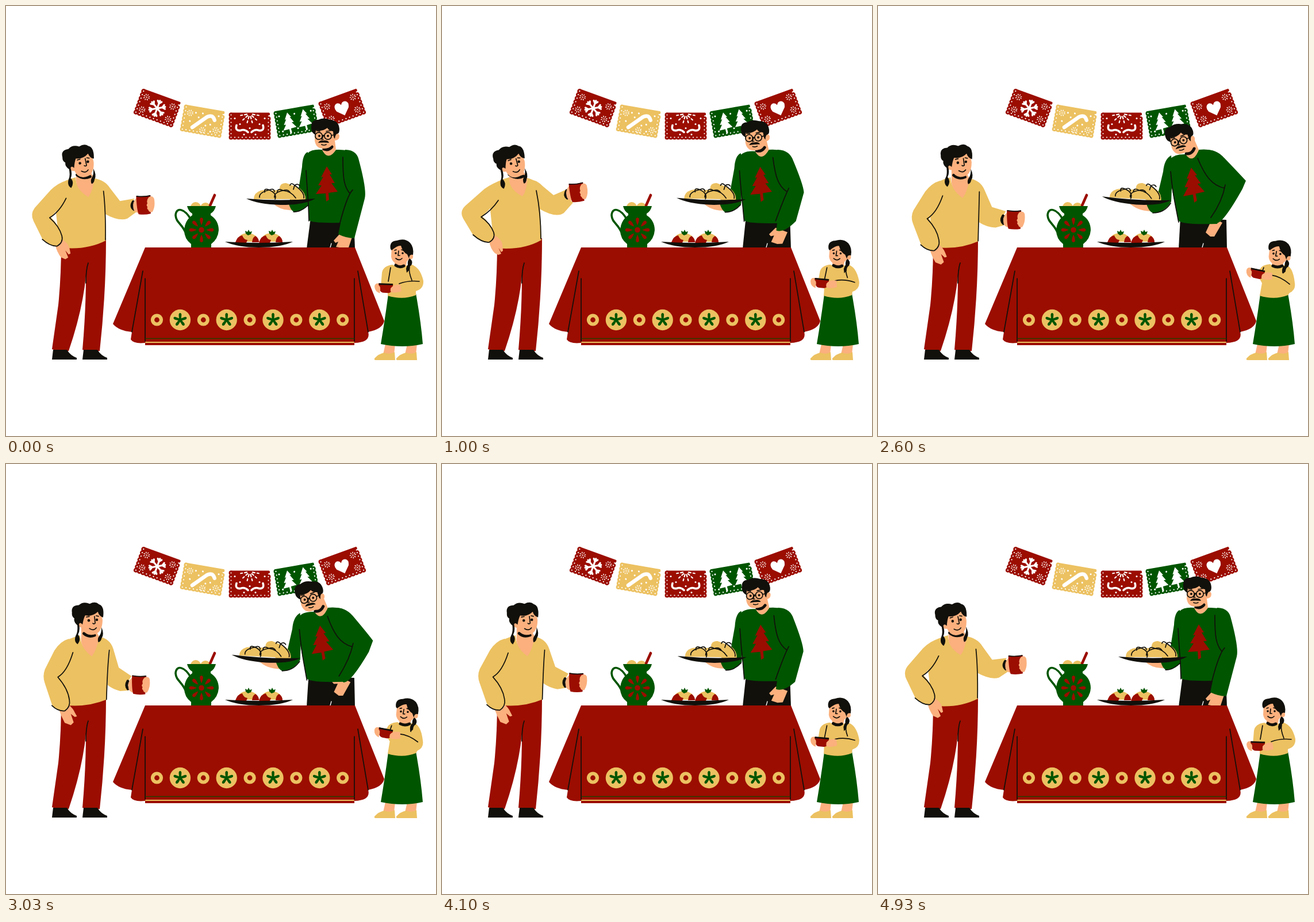
Animation of 748x748 px, one loop 5010 ms. Source, as an HTML page:

```html
<!DOCTYPE html>
<html lang="en">
<head>
<meta charset="utf-8">
<title>Holiday table</title>
<style>
html, body { margin: 0; height: 100%; overflow: hidden; background: #fff }
svg { display: block; width: 100vw; height: 100vh; stroke-linecap: round; stroke-linejoin: round }
.r { fill: #9b0d00 } .g { fill: #005500 } .y { fill: #ecc161 } .s { fill: #fbb07d } .k { fill: #11100b } .w { fill: #fff }
.l { fill: none; stroke: #11100b; stroke-width: 1.7 }
.b { fill: none; stroke: #11100b; stroke-width: 5 }
.cut { fill: none; stroke: #fff }
</style>
</head>
<body>
<svg viewBox="0 0 748 748">
<defs>
  <path id="tree" d="M0-31L9-17 5-17 14-2 8-2 19 13 3 15 4 27-1 30-2 16-19 17-9 2-15 2-6-13-10-12Z"/>
  <g id="burst" class="cut"><circle r="4.2" stroke-width="3" stroke-dasharray="1.2 2.1" stroke-linecap="butt"/><circle r=".6"/></g>
  <g id="shoe"><path class="k" d="M82 598H106Q112 608 123 612V615H80Z"/></g>
  <g id="foot"><path class="s" d="M660 588H677L675 606H656Z"/><path class="y" d="M641 613Q648 605 658 603Q668 607 676 602L677 616H643Q640 616 641 613Z"/></g>
  <g id="sope">
    <path class="y" d="M-18 6Q-16-8 0-9Q17-8 20 6Z"/>
    <path class="r" d="M-21 7Q-17-4-9-5Q-7 2 0 3L-2 8H-20ZM8 7Q9-2 14-4Q20 0 20 7Z"/>
    <path class="g" d="M-3-8L-4-13 0-11 2-15 4-11 8-12 6-7 1-5Z"/>
  </g>
</defs>

<g id="flags"></g>

<g data-phase="0">
  <path class="k" d="M530 368L523 422H607L605 372Z" data-to="M526 368L523 422H607L606 372Z"/>
  <path class="cut" stroke-width="1.3" d="M564 420L566 413"/>
  <path class="s" d="M581 396L570 408 573 412 578 410 574 419 586 421 596 420 602 402Z" data-to="M579 366L567 376 570 379 577 379 570 394 578 401 585 401 599 377Z"/>
  <path class="s" d="M464 343Q475 339 493 340L500 355Q478 357 464 343Z" data-to="M436 342Q447 339 468 340L474 357Q450 356 436 342Z"/>
  <path class="g" d="M550 250Q526 248 521 262L527 372Q528 378 583 377L600 320 604 256Q595 249 574 250Q560 270 550 250Z" data-to="M535 258Q508 257 503 276L522 372Q524 381 590 379L606 330 600 262Q585 247 558 250Q548 274 535 258Z"/>
  <path class="g" d="M525 254Q516 257 515 280L509 318 491 341Q495 356 501 358Q512 359 526 346L527 280Z" data-to="M510 260Q498 266 496 288L488 322 466 341Q470 357 478 360Q498 360 510 340L512 290Z"/>
  <path class="s" d="M550 250Q560 271 574 250L572 234 552 238Z" data-to="M535 258Q548 276 558 250L550 232 532 240Z"/>
  <path class="g" d="M590 250Q608 250 613 265Q628 320 624 335L606 404Q592 404 578 397L592 330 580 265Z" data-to="M570 250Q588 249 602 264L630 293Q640 304 634 318L600 379Q588 378 578 369L604 316 556 268Z"/>
  <path class="l" d="M586 263C586 300 588 314 598 326M603 320Q594 328 581 377" data-to="M556 265C568 294 580 312 603 317M604 311Q599 340 579 368"/>
  <path class="l" d="M522 286Q524 320 526 345L527 374M500 358Q512 359 525 347" data-to="M509 288Q512 320 517 345L523 376M478 360Q498 360 509 343"/>
  <use href="#tree" class="r" transform="translate(558 310) rotate(0)" data-to="translate(548 312) rotate(-6)"/>
  <g transform="translate(478 336) rotate(0)" data-to="translate(449.5 335.5) rotate(3)">
    <path class="y" d="M-2-16Q-3-28 9-28Q24-23 34-18Q44-10 43 2H18Z"/>
    <path class="y" d="M-47 0Q-47-11-35-15Q-26-17-16-15Q-4-17 8-15Q28-15 27 0Z"/>
    <path class="l" d="M-10 0Q-6-10-20-16Q-38-12-37-3M-20-16Q-30-20-28-12M-20-16Q-12-20-11-13M26-2Q18-14 4-15Q-12-12-11-3M4-15Q-6-20-6-12M4-15Q12-18 16-12M40-2Q42-12 24-24M24-24Q18-30 16-24M24-24Q30-28 33-23M24-24L22-17"/>
    <path class="k" d="M-60-1Q0 4 60-1Q42 10 0 10Q-40 9-60-1Z"/>
  </g>
  <path class="b" d="M553 249Q561 252 567 245" data-to="M536 257Q546 258 550 248"/>
  <g transform="translate(552 226) rotate(0)" data-to="translate(523.5 235.5) rotate(-14)">
    <path class="s" d="M-14-14L-15 8Q-13 23 2 22Q16 21 19 8Q28 8 28 0Q27-6 20-3L18-16Z"/>
    <path class="k" d="M-21-13Q-22-29-9-28Q0-33 12-28Q27-27 28-12Q28-5 25-4Q21-4 20 5L18 2 17-8Q9-9 7-14Q-2-7-13-10L-14-2Q-21-6-21-13Z"/>
    <g class="l"><circle cx="-8" r="6.2"/><circle cx="8" r="6.2"/><path d="M-2 0Q0-2 2 0M14-1L20-2M-12-9L-6-8M5-8L12-9M0 0L-3 6H0"/></g>
    <circle class="k" cx="-7" r="2"/><circle class="k" cx="8" r="2"/>
    <path class="k" d="M-9 12Q-6 7 0 8Q8 7 10 12Q0 11-9 12Z"/>
    <path class="l" d="M-3 15Q1 17 5 15"/>
  </g>
</g>

<g id="table">
  <path class="r" d="M242 420H607L658 548Q655 562 630 567Q635 585 606 586V590H242V586Q222 588 217 580L219 567Q196 565 186 553Z"/>
  <path class="l" d="M238 461L219 567M242 474V583M606 474V583M612 461L630 567"/>
  <path d="M243 578.5H605" fill="none" stroke="#243d00" stroke-width="1.6"/>
  <path d="M243 585H605" fill="none" stroke="#ecc161" stroke-width="1.8"/>
</g>

<g id="pitcher">
  <path d="M322 372C311 352 296 349 295 364C296 378 307 378 314 398" fill="none" stroke="#005500" stroke-width="3.6"/>
  <circle class="y" cx="330" cy="350" r="9"/><circle class="y" cx="347" cy="351" r="9"/>
  <path d="M355 347L363 329" stroke="#9b0d00" stroke-width="4.6"/>
  <path class="g" d="M315 348H365Q363 357 356 361V364Q370 373 370 390Q369 405 357 414V420H322V414Q310 405 310 390Q311 373 324 364V361Q317 357 315 348Z"/>
</g>
<use href="#sope" x="420" y="404"/><use href="#sope" x="461" y="404"/>
<path class="k" d="M381 410Q440 414 499 410Q479 420 440 420Q403 420 381 410Z"/>

<g data-phase="975">
  <path class="r" d="M96 414Q96 470 91 520L80 597Q94 602 109 600Q133 530 139 470Q139 530 133 598Q148 602 163 600Q174 500 174 404Z"/>
  <path class="l" d="M143 447Q139 458 139 482"/>
  <use href="#shoe"/><use href="#shoe" x="53"/>
  <path class="y" d="M117 298Q96 303 84 315L84 355 88 394Q88 418 92 421Q140 426 173 407L170 340 163 309Q157 300 147 299L140 330Q117 318 117 298Z" data-to="M130 298Q112 302 100 312L92 360 97 400Q97 416 100 419Q140 424 175 410L178 340 181 315Q173 302 162 300L150 334Q130 318 130 298Z"/>
  <path class="s" d="M117 282V299Q116 319 140 331Q147 322 149 300L140 285Z" data-to="M132 282V299Q129 319 150 335Q160 322 163 300L155 285Z"/>
  <path class="s" d="M82 409L90 398Q103 405 105 414L106 426 103 428 98 420 103 431 98 433 92 430Q84 422 82 409Z" data-to="M93 429L111 421Q118 427 121 434L125 440 121 441 114 436 119 451 114 456 103 452Q98 442 93 429Z"/>
  <path class="y" d="M104 303Q88 308 74 318L40 348Q30 358 37 370L55 400Q70 412 82 411Q93 405 90 394Q84 378 70 366L98 338Z" data-to="M110 304Q95 308 85 325L70 358Q66 370 70 382L82 420Q90 432 104 431Q114 424 112 412Q110 390 96 372L118 327Z"/>
  <path class="l" d="M98 338Q86 356 68 367Q84 378 90 394Q93 405 82 411Q70 412 54 398" data-to="M118 327Q108 362 92 371Q110 392 112 412Q114 424 104 431Q92 432 82 422"/>
  <path class="y" d="M147 300Q165 302 176 314L194 329 217 319Q212 330 228 342L212 360Q198 370 168 352L163 325Z" data-to="M162 300Q182 304 187 322L195 356 216 374Q208 382 210 399L196 399Q184 395 177 388L180 325Z" data-mid="M156 300Q175 303 183 318L199 344 224 344Q217 356 224 368L209 376Q194 379 173 367L172 325Z"/>
  <path class="l" d="M164 321Q172 360 172 405" data-to="M181 324Q177 350 175 410"/>
  <path class="b" d="M217 321Q212 329 218 334" data-to="M209 383Q205 390 209 396" data-mid="M221 351Q216 359 222 364"/>
  <g transform="translate(235 324) rotate(-6)" data-to="translate(229 389) rotate(2)" data-mid="translate(240 357) rotate(-1)">
    <path class="s" d="M-12-13Q-20-6-19 3Q-19 13-9 14Z"/>
    <path class="r" d="M-13-16Q0-14 12-16L11 16Q0 18-10 16Q-13 8-13-16Z"/>
    <path class="l" d="M-12-15.5Q0-13.5 11-15.5"/>
    <path class="s" d="M9-13Q16-16 18-10Q20 4 14 13Q8 14 7 9Q4 7 6 4Q3 1 6-2Q4-8 9-13Z"/>
  </g>
  <path class="b" d="M117 293Q129 302 142 296" data-to="M137 295Q145 302 155 298"/>
  <g transform="translate(127 273) rotate(-10)" data-to="translate(153 272) rotate(0)">
    <path class="s" d="M-20-12L-25 4Q-26 13-18 12Q-14 24-4 25Q16 26 17 0L14-20-10-18Z"/>
    <path class="k" d="M-36-14Q-38-27-24-27Q-16-34-5-29Q5-34 11-28Q21-25 18-5Q11-7 9-15Q-1-6-13-9Q-16-4-18 7Q-22 2-24 6Q-22 18-26 24Q-20 32-27 41Q-34 36-30 26Q-26 20-27 8Q-34 2-32-4Q-37-7-36-14Z"/>
    <path class="k" d="M15 12Q20 24 15 31Q13 38 9 38Q7 32 11 27Q15 22 15 12Z"/>
    <circle class="k" cx="-7" r="2.3"/><circle class="k" cx="7" cy="-1" r="2.3"/>
    <path class="l" d="M3-7L4 5Q2 7 0 5M-6 14Q1 19 6 13M-11-6L-6-7M6-8L10-7"/>
  </g>
</g>

<g data-phase="0">
  <use href="#foot"/><use href="#foot" x="38"/>
  <path class="g" d="M665 501Q690 513 713 500Q722 550 725 588Q690 596 652 588Q660 540 665 501Z"/>
  <path class="y" d="M672 450Q656 452 654 464L652 488 664 487 664 504Q690 512 713 503L713 496Q727 492 726 478Q720 452 702 449Q688 458 672 450Z" data-to="M682 449Q668 450 664 458L658 464 668 482 664 504Q690 512 713 503L716 499Q727 494 725 482Q722 452 708 450Q694 458 682 449Z"/>
  <path class="l" d="M669 455L665 479M702 454Q700 462 706 477M684 483Q700 477 719 479" data-to="M671 455L667 466M706 453Q703 458 704 464M684 468Q700 470 716 484"/>
  <g transform="translate(661 491) rotate(2)" data-to="translate(660 466) rotate(12)">
    <path class="s" d="M-12-8Q-20-9-20-2Q-19 7-10 9ZM9 0Q12-8 25-7L27 4Q14 9 8 6Z"/>
    <path class="r" d="M-13-8H12Q12 8 4 8H-4Q-12 8-13-8Z"/>
    <path class="l" d="M-12-7.5H11M-12-6.5H11"/>
    <path class="s" d="M8 0Q12-6 18-6L22 4Q12 8 8 5ZM-18-5Q-10-5-10 0Q-9 6-13 8Z"/>
  </g>
  <path class="s" d="M676 438H698L696 452Q686 458 676 452Z" data-to="M686 438H708L704 452Q694 458 685 452Z"/>
  <path class="b" d="M678 451Q685 456 692 452" data-to="M687 452Q695 456 703 452"/>
  <g transform="translate(684 430) rotate(0)" data-to="translate(694 431) rotate(4)">
    <path class="s" d="M-13-13L-14 6Q-12 18-1 18Q12 18 17 10Q25 12 24 4L14-14Z"/>
    <path class="k" d="M-15-7Q-18-21-4-22Q10-27 19-18Q26-10 24 3Q18 1 17 9L14 2Q6-2 3-13Q-3-14-13-5Z"/>
    <path class="k" d="M18 9Q25 14 21 21Q17 23 17 30L13 34 12 27Q13 22 15 20Q14 13 18 9Z"/>
    <circle class="k" cx="-6" r="1.8"/><circle class="k" cx="6" r="1.8"/>
    <path class="l" d="M-1-4L-2 4H1M-6 9Q0 14 5 9M-8-5L-5-6M4-6L7-5"/>
  </g>
</g>
</svg>
<script>
const LOOP = 5010;
const $ = id => document.getElementById(id);
const add = (id, markup) => $(id).insertAdjacentHTML('beforeend', markup);
const ring = (n, shape) => Array.from({length: n}, (_, i) => `<g transform="rotate(${i * 360 / n})">${shape}</g>`).join('');
const at = (x, y, markup) => `<g transform="translate(${x} ${y})">${markup}</g>`;
const bursts = (...spots) => spots.map(([x, y]) => `<use href="#burst" x="${x}" y="${y}"/>`).join('');
const dots = (...spots) => spots.map(([x, y]) => `<circle class="w" cx="${x}" cy="${y}" r="1.5"/>`).join('');
const cut = (d, width) => `<path class="cut" d="${d}" stroke-width="${width}"/>`;

// Cut-paper flags: scalloped on three sides
function flag(x, y, angle, color, art) {
  const edge = (stroke, width) =>
    `<path d="M-32.5-20V19H32.5V-20" fill="none" stroke="${stroke}" stroke-width="${width}" stroke-dasharray="0 6.5"/>`;
  add('flags', `<g transform="translate(${x} ${y}) rotate(${angle})">
    <rect x="-35" y="-24" width="70" height="5" rx="2" fill="${color}"/>
    <rect x="-32" y="-23" width="64" height="42" fill="${color}"/>${edge(color, 8)}${edge('#fff', 2.2)}${art}</g>`);
}
const red = '#9b0d00', green = '#005500', yellow = '#ecc161';
const corners = bursts([-24, -12], [24, -12], [-24, 11], [24, 11]);
const curl = cut('M-23-2Q-26 8-16 7Q-9 4-3 10', 3.6);
const smallTree = (x, y) => `<use href="#tree" class="w" transform="translate(${x} ${y}) scale(.62)"/>`;
flag(263, 178, 20, red, corners + ring(6, cut('M0 0V-14M-3.5-13L0-9 3.5-13', 3.2)));
flag(342, 201, 10, yellow, cut('M-16 13L6-9Q15-16 20-6', 6.5) + bursts([-24, -11], [25, 11], [2, 15])
  + dots([-14, -13], [-8, -6], [-22, 3], [14, 3], [6, 6], [26, -14], [-2, -14], [16, 15]));
flag(424, 209.5, 0, red, curl + `<g transform="scale(-1 1)">${curl}</g>`
  + [-80, -48, -16, 16, 48, 80].map(a => `<g transform="translate(0 -22) rotate(${a})">${cut('M0 5V9M0 13V16', 2.2)}</g>`).join('')
  + dots([-26, -14], [26, -14], [-17, -4], [17, -4], [0, 3], [-10, 14], [10, 14]));
flag(505, 201, -10, green, smallTree(-13, 1) + smallTree(15, 0)
  + dots([-28, -14], [-1, -14], [28, -14], [1, 12], [-26, 13], [27, 13]));
flag(585, 178, -20, red, corners
  + '<path class="w" d="M0 13L-11 2Q-15-8-8-11Q-2-12 0-6Q3-12 9-10Q15-7 11 2Z"/>');

// Cloth medallions and pitcher flower
for (let i = 0; i < 9; i++) add('table', at(262.5 + i * 40.4, 546, i % 2
  ? `<circle class="y" r="18.2"/>${ring(5, '<path class="g" d="M-1.6 2L-2.4-9Q-2-12 0-12Q2-12 2.4-9L1.6 2Z"/>')}`
  : '<circle class="y" r="10.6"/><circle class="r" r="4.4"/>'));
add('pitcher', at(340, 389.5, '<circle class="r" r="4.8"/>'
  + ring(8, '<path class="r" d="M0-8Q-4-17-2.5-20Q0-23 2.5-20Q4-17 0-8Z"/>')));

// Every element with data-to swings from its own numbers to those and back
const NUMBER = /-?\d*\.?\d+/g;
const numbers = text => text && text.match(NUMBER).map(Number);
const parts = [...document.querySelectorAll('[data-to]')].map(el => {
  const attr = el.hasAttribute('d') ? 'd' : 'transform', from = el.getAttribute(attr);
  return {el, attr, from, a: numbers(from), b: numbers(el.dataset.to), mid: numbers(el.dataset.mid),
    phase: +el.closest('[data-phase]').dataset.phase};
});

function draw() {
  const t = performance.now() % LOOP;
  for (const {el, attr, from, a, b, mid, phase} of parts) {
    const k = (1 - Math.cos(2 * Math.PI * (t - phase) / LOOP)) / 2;
    let i = 0;
    el.setAttribute(attr, from.replace(NUMBER, () => {
      const bulge = mid ? 4 * k * (1 - k) * (mid[i] - (a[i] + b[i]) / 2) : 0;
      const value = a[i] + (b[i] - a[i]) * k + bulge;
      i++;
      return ' ' + value.toFixed(2);
    }));
  }
  requestAnimationFrame(draw);
}
draw();
</script>
</body>
</html>
```
